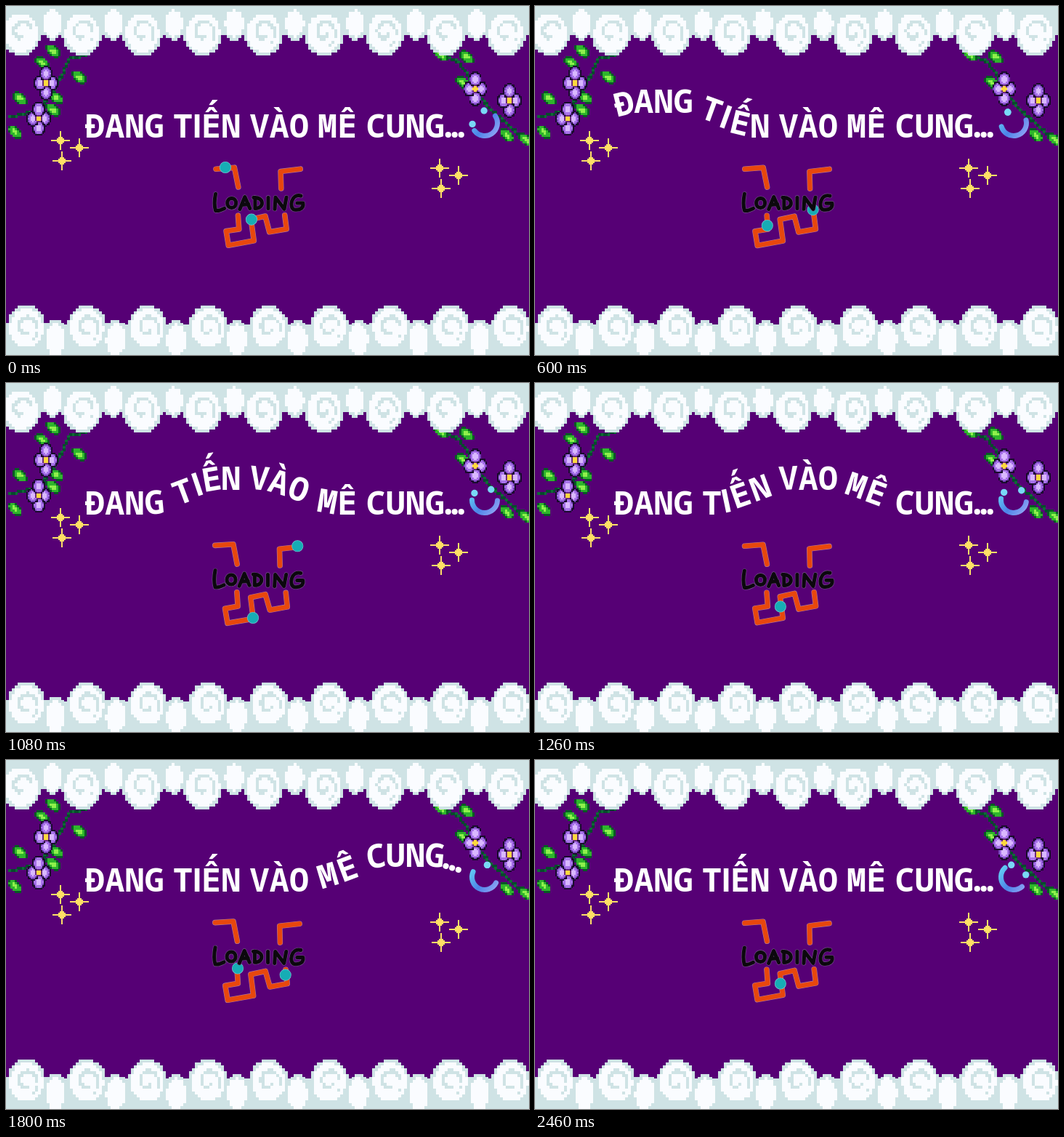
Write an HTML page with a canvas that moves like this. It is 720 px wide and 480 px high and loops after 2520 ms.

```html
<!DOCTYPE html>
<html lang="vi">
<head>
<meta charset="utf-8">
<style>
html, body { margin: 0; width: 100%; height: 100%; overflow: hidden; background: #560075; }
canvas { display: block; }
</style>
</head>
<body>
<canvas id="stage" width="720" height="480"></canvas>
<script>
const LOOP = 2520, TICK = 60, TAU = Math.PI * 2;
const ctx = document.getElementById('stage').getContext('2d');
const scene = document.createElement('canvas');
scene.width = 720;
scene.height = 480;
const art = scene.getContext('2d');

// Paint square cells around a centre; colorAt gets offsets in px and may return null.
function plot(cx, cy, rx, ry, cell, colorAt) {
  const snap = v => Math.floor(v / cell) * cell;
  for (let y = snap(cy - ry); y <= cy + ry; y += cell) {
    for (let x = snap(cx - rx); x <= cx + rx; x += cell) {
      const color = colorAt(x + cell / 2 - cx, y + cell / 2 - cy);
      if (!color) continue;
      art.fillStyle = color;
      art.fillRect(x, y, cell, cell);
    }
  }
}

// Layers are [relative radius, colour] from the inside out.
function blob(cx, cy, rx, ry, turn, cell, layers) {
  const c = Math.cos(turn), s = Math.sin(turn), reach = Math.max(rx, ry);
  plot(cx, cy, reach, reach, cell, (x, y) => {
    const d = Math.hypot((x * c + y * s) / rx, (y * c - x * s) / ry);
    const layer = layers.find(([r]) => d < r);
    return layer && layer[1];
  });
}

const PALE = '#cfe3e5', WHITE = '#fafcff';

function puff(cx, cy) {
  plot(cx, cy, 29, 34, 4, (x, y) => {
    const d = Math.hypot(x, y * 0.86);
    if (d > 27) return null;
    if (d > 23) return PALE;
    const arm = d / 14 - Math.atan2(y, x) / TAU + 4;
    return arm % 1 < 0.32 && d > 4 && d < 17 ? PALE : WHITE;
  });
}

function clouds() {
  const small = [[0.8, WHITE], [1, PALE]];
  art.fillStyle = PALE;
  art.fillRect(0, 0, 720, 40);
  art.fillRect(0, 438, 720, 42);
  for (let x = -83.4; x < 800; x += 83.4) {
    blob(x + 64, 24, 16, 23, 0, 4, small);
    blob(x + 68, 459, 17, 27, 0, 4, small);
    puff(x + 21, 37);
    puff(x + 28, 443);
  }
}

function vine(points) {
  for (let i = 2; i < points.length; i += 2) {
    const [x0, y0, x1, y1] = points.slice(i - 2, i + 2);
    const steps = Math.hypot(x1 - x0, y1 - y0) / 3;
    for (let k = 0; k < steps; k++) {
      art.fillStyle = k % 3 ? '#074a2c' : '#0d6b35';
      art.fillRect(Math.round((x0 + (x1 - x0) * k / steps) / 3) * 3,
                   Math.round((y0 + (y1 - y0) * k / steps) / 3) * 3, 4, 4);
    }
  }
}

function leaf(x, y) {
  blob(x, y, 12, 7, 0.7, 3, [[0.4, '#8ff04c'], [0.78, '#2fb52c'], [1, '#075a24']]);
}

function flower(x, y) {
  for (let i = 0; i < 4; i++) {
    const a = i * TAU / 4;
    blob(x + Math.cos(a) * 8, y + Math.sin(a) * 13, 9, 11, 0, 2,
         [[0.42, '#d9b8ff'], [0.68, '#a873ea'], [0.8, '#7440b8'], [1, '#190b2c']]);
  }
  blob(x, y, 5, 6, 0, 2, [[0.65, '#ffd83d'], [1, '#6b2a7c']]);
}

function sparkle(x, y) {
  plot(x | 1, y | 1, 12, 12, 2, (u, v) => {
    const a = Math.abs(u), b = Math.abs(v);
    return Math.min(a, b) < 1.5 || a + b < 7 ? '#ffdf66' : null;
  });
}

function buildScene() {
  art.fillStyle = '#560075';
  art.fillRect(0, 0, 720, 480);
  vine([108, 66, 84, 71, 76, 92, 46, 140, 0, 152]);
  vine([600, 66, 622, 75, 660, 135, 720, 188]);
  [[65, 62], [50, 78], [101, 98], [19, 127], [69, 126], [65, 143], [12, 173],
   [599, 67], [634, 70], [629, 105], [690, 178], [716, 184]].forEach(p => leaf(...p));
  [[55, 106], [45, 155], [646, 114], [693, 130]].forEach(p => flower(...p));
  for (const [x, y] of [[75, 184], [597, 222]]) {
    sparkle(x, y);
    sparkle(x + 25, y + 10);
    sparkle(x + 1, y + 29);
  }
  clouds();
}

const TITLE = [...'ĐANG TIẾN VÀO MÊ CUNG…'];
const advance = char => char === 'I' || char === ' ' ? 12 : 27.2;

// A hump with a short flat top runs along the letters.
function drawTitle(t) {
  const peak = 2 + (t - 600) / 72, height = 34;
  let x = 109;
  ctx.fillStyle = '#fff';
  ctx.textAlign = 'center';
  TITLE.forEach((char, i) => {
    const d = i - peak, u = Math.min(1, Math.max(0, (6 - Math.abs(d)) / 5));
    const slope = 6 * u * (1 - u) / 5 * height / 27;
    ctx.save();
    ctx.translate(x + advance(char) / 2, 164 - height * u * u * (3 - 2 * u));
    ctx.rotate(Math.sign(d) * Math.atan(slope));
    ctx.font = `bold 45px ${char === 'I' ? 'Roboto, sans-serif' : '"Noto Sans Mono", monospace'}`;
    ctx.fillText(char, 0, 16.5);
    ctx.restore();
    x += advance(char);
  });
}

const MAZE = [
  [[289, 223], [314, 221], [319, 248]],
  [[319, 287], [320, 306], [302, 309], [305, 329], [340, 323], [336, 294],
   [356, 290], [362, 312], [386, 308], [384, 289]],
  [[378, 250], [377, 227], [404, 224]]
];
const TRAIL = MAZE.flat();
const LETTERS = [
  'M289 258C287 268 287 274 289 281C294 282 299 279 301 278',
  'M311 264C303 264 303 277 311 277C319 277 319 264 311 264',
  'M322 279L329 262L336 278M325 273L334 272',
  'M343 263L343 278C356 278 356 262 341 263',
  'M361 263L361 278',
  'M370 279L371 263L383 279L386 263',
  'M406 261C393 257 389 278 397 280C406 281 410 277 409 271L401 271'
].map(d => new Path2D(d));

function pointAt(distance) {
  for (let i = 1; i < TRAIL.length; i++) {
    const [x0, y0] = TRAIL[i - 1], [x1, y1] = TRAIL[i];
    const length = Math.hypot(x1 - x0, y1 - y0);
    if (distance <= length) {
      const u = distance / length;
      return [x0 + (x1 - x0) * u, y0 + (y1 - y0) * u];
    }
    distance -= length;
  }
  return null;
}

function strokeTwice(path, width, color, edge) {
  for (const [w, c] of [[width + 1.2, edge], [width, color]]) {
    ctx.lineWidth = w;
    ctx.strokeStyle = c;
    ctx.stroke(path);
  }
}

function drawLoading(t) {
  const step = Math.floor((t % 1280 + 30) / 100) % 13;
  const wobble = k => 1.3 * Math.sin(k * 12.9 + step * 7.3);
  ctx.lineCap = ctx.lineJoin = 'round';
  MAZE.forEach((line, n) => {
    const path = new Path2D();
    line.forEach(([x, y], i) => path.lineTo(x + wobble(n + i), y + wobble(n + i + 5)));
    strokeTwice(path, 6.4, '#e8470d', '#b07a9c');
  });
  // Two balls share the trail, half of it apart.
  for (const lap of [0, 13]) {
    const spot = pointAt(13 + (step + lap) * 15.6);
    if (!spot) continue;
    const ball = new Path2D();
    ball.arc(...spot, 7.2, 0, TAU);
    strokeTwice(ball, 0.5, '#16adb5', '#7fc8d4');
    ctx.fillStyle = '#16adb5';
    ctx.fill(ball);
  }
  LETTERS.forEach((letter, i) => {
    ctx.save();
    ctx.translate(wobble(i) * 0.4 - 0.5, wobble(i + 3) * 0.4);
    strokeTwice(letter, 5, '#0b080d', '#75508a');
    ctx.restore();
  });
}

// The face turns slowly while its eyes merge and part.
function drawSmile(t) {
  const middle = (55 + 85 * t / LOOP) * TAU / 360;
  const spread = 0.8 * Math.cos(Math.PI * t / 1200);
  const tint = ctx.createLinearGradient(640, 148, 676, 176);
  tint.addColorStop(0, '#64d3f5');
  tint.addColorStop(0.55, '#4d83e8');
  tint.addColorStop(1, '#8fa4f4');
  const mouth = new Path2D();
  mouth.arc(659, 161, 17.5, middle - 1.55, middle + 1.55);
  ctx.lineCap = 'round';
  ctx.lineWidth = 7;
  ctx.strokeStyle = tint;
  ctx.stroke(mouth);
  ctx.fillStyle = '#79d8f6';
  for (const side of [-1, 1]) {
    const a = middle + 2.9 + side * spread;
    ctx.beginPath();
    ctx.arc(659 + 17 * Math.cos(a), 161 + 17 * Math.sin(a), 4.7, 0, TAU);
    ctx.fill();
  }
}

function loop() {
  const t = Math.floor(performance.now() % LOOP / TICK) * TICK;
  ctx.drawImage(scene, 0, 0);
  drawTitle(t);
  drawLoading(t);
  drawSmile(t);
  requestAnimationFrame(loop);
}

buildScene();
loop();
</script>
</body>
</html>
```
